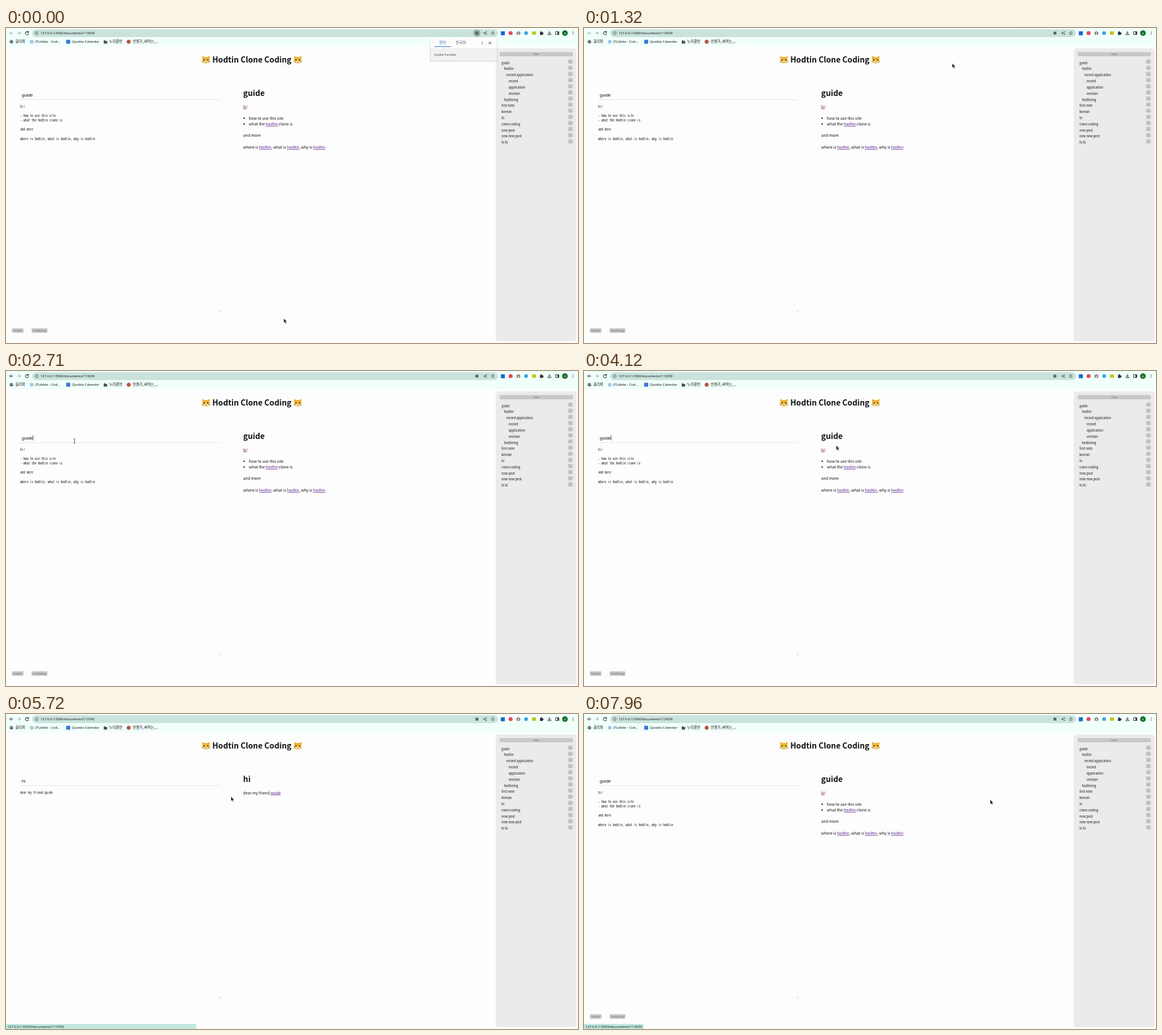
Write an HTML page that moves like this. It is 1007x556 px and loops after 7990 ms.

```html
<!DOCTYPE html>
<html lang="en">
<head>
<meta charset="utf-8">
<title>Notes</title>
<style>
html, body { margin: 0; width: 100%; height: 100%; overflow: hidden; background: #fdfdfd; }
svg { display: block; width: 1007px; height: 556px; }
text { white-space: pre; fill: #111; }
.ui { font-family: "Noto Sans", "Noto Sans CJK KR", "Noto Sans CJK JP", sans-serif; }
.doc { font-family: "Noto Sans CJK KR", "Noto Sans CJK JP", "Noto Sans CJK", sans-serif; }
.form { font-family: "Liberation Sans", Arial, sans-serif; }
.mono { font-family: "Noto Sans Mono CJK KR", "Noto Sans Mono CJK JP", monospace; }
.bold { font-weight: 700; }
.mid { text-anchor: middle; }
.link { fill: #551a8b; text-decoration: underline; }
.icon { fill: none; stroke: #333; stroke-width: 1; stroke-linecap: round; stroke-linejoin: round; }
</style>
</head>
<body>
<svg id="stage" viewBox="0 0 1007 556"></svg>
<script>
const LOOP = 7990;
const BODY = 6.88, HEAD = 13.76, FORM = 5.73;

const text = (x, y, str, size, cls, fill = '') =>
  `<text x="${x}" y="${y}" font-size="${size}" class="${cls}"${fill && ` style="fill:${fill}"`}>${str}</text>`;
const rect = (x, y, w, h, fill, r = 0) =>
  `<rect x="${x}" y="${y}" width="${w}" height="${h}" rx="${r}" fill="${fill}"/>`;
const circle = (x, y, r, fill) => `<circle cx="${x}" cy="${y}" r="${r}" fill="${fill}"/>`;
const icon = (x, y, d, style = '') =>
  `<path class="icon" transform="translate(${x} ${y})" d="${d}" style="${style}"/>`;
const group = (id, content) => `<g id="${id}">${content}</g>`;
const dots = x => y => [-2.2, 0, 2.2].map(d => circle(x, y + d, .7, '#444')).join('');
const link = str => `<tspan class="link">${str}</tspan>`;

const ARROW_LEFT = 'M2.7 0H-2.7M0 -2.7L-2.7 0 0 2.7';

function cat(x, y) {
  return `<g transform="translate(${x} ${y})">
    <path d="M-6.6 -6.6Q-6 -7.3 -2.6 -4.6H2.6Q6 -7.3 6.6 -6.6L6.4 1Q6 6.8 0 6.8T-6.4 1Z" fill="#f9bf2c"/>
    <path d="M-5.7 -5.3L-5.3 -2 -3.5 -3.8ZM5.7 -5.3L5.3 -2 3.5 -3.8Z" fill="#e58a55"/>
    <path d="M0 -4.5V-1.8M-1.7 -4.3V-2.5M1.7 -4.3V-2.5" stroke="#c7862a" stroke-width=".8"/>
    <ellipse cy="3.8" rx="3.6" ry="2.6" fill="#ffe7a2"/>
    ${circle(-3.1, .2, 1.2, '#3b2f2a')}${circle(3.1, .2, 1.2, '#3b2f2a')}
    <path d="M-1.2 2H1.2L0 3.2Z" fill="#d9576b"/>
    <path d="M0 3.2V4.2M-2 4.5Q-.8 5.5 0 4.2Q.8 5.5 2 4.5" fill="none" stroke="#5b4332" stroke-width=".5"/>
    <path d="M-4 3L-7.8 2.2M-4 4L-7.6 4.6M4 3L7.8 2.2M4 4L7.6 4.6" stroke="#6b5a48" stroke-width=".45"/>
  </g>`;
}

function browserBar() {
  return rect(0, 0, 1007, 32.5, '#f1fffb') + rect(46, 2.3, 820, 13.6, '#c9e2dc', 6.8) +
    `<g id="back">${icon(9.5, 9, ARROW_LEFT)}</g>` +
    icon(23, 9, 'M-2.7 0H2.7M0 -2.7L2.7 0 0 2.7', 'stroke:#9aa6a2') +
    icon(37, 9, 'M2.2 -1.6A2.8 2.8 0 1 0 2.7 1M2.7 -3V-1.2H.8', 'stroke-width:1.1') +
    icon(54, 9, 'M-2.7 0A2.7 2.7 0 1 0 2.7 0A2.7 2.7 0 1 0 -2.7 0M0 -.2V1.4M0 -1.5V-1.4', 'stroke-width:.6') +
    `<text id="address" x="61" y="11.2" font-size="5.85" class="ui"></text>` +
    circle(829, 9, 6.3, '#93aaa4').replace('<circle', '<circle id="glow"') +
    rect(826.5, 6.5, 5, 5, '#56625f', .6) +
    icon(843.5, 9, 'M2 -2L-2 0 2 2', 'stroke-width:.7') +
    circle(845.5, 7, 1, '#444') + circle(841.5, 9, 1, '#444') + circle(845.5, 11, 1, '#444') +
    icon(857, 9, 'M0 -3L.9 -1 3 -.8 1.4 .6 1.9 2.7 0 1.6 -1.9 2.7 -1.4 .6 -3 -.8 -.9 -1Z', 'stroke-width:.6') +
    rect(871.2, 5.8, 7, 7, '#1769d2') + circle(888.3, 9, 3.6, '#e14a62') +
    rect(898.8, 7, 6.6, 4.8, '#777', 1) + rect(900.8, 6, 2.6, 2, '#777') + circle(902.1, 9.4, 1.4, '#eee') +
    circle(915.6, 9, 3.3, '#35a4e8') + rect(926, 6, 7, 6, '#c9c51b', 1) +
    rect(940, 7.2, 5, 5, '#333', .6) + circle(942.3, 7, 1.3, '#333') + circle(945.2, 9.5, 1.3, '#333') +
    icon(956.7, 9, 'M0 -3V1M-1.9 -.8L0 1.1 1.9 -.8M-2.8 1.5V2.8H2.8V1.5') +
    icon(970.5, 9, 'M-2.7 -2.5H2.7V2.5H-2.7Z') + rect(970.8, 6.5, 2.4, 5, '#333') +
    circle(984, 9, 5, '#18752b') + text(984, 10.7, 'a', 5, 'ui mid', '#dff5e2') + dots(998.3)(9) +
    circle(9.5, 24.2, 3, '#4a5351') + icon(9.5, 24.2, 'M-2 -1L0 0 -1 2M.5 -2L2 0', 'stroke:#e5f3ef;stroke-width:.7') +
    text(16.5, 26.4, '클리퍼', 6.3, 'ui') +
    circle(45.3, 24.2, 3.3, '#9cc9e6') + text(51.7, 26.4, 'JTLibble - Cod…', 6.1, 'ui') +
    rect(106, 20.8, 7, 7, '#3b78dc', .8) + text(116, 26.4, 'Quobla Calendar', 6.1, 'ui') +
    `<path d="M172 21.8h2.4l.8 1h3v4.7h-6.2z" fill="#4c5653"/>` + text(181.5, 26.4, '누리콤반', 6.3, 'ui') +
    circle(216, 24.2, 3.5, '#b8573f') + text(223, 26.4, '언젠가_써먹는_…', 6.3, 'ui');
}

function sidebar() {
  const items = ['0guide', '1hodtin', '2record application', '3record', '3application', '3velsitan',
    '1hodtining', '0first note', '0korean', '0hi', '0clone coding', '0new post', '0new new post', '0hi hi'];
  return rect(862, 36, 142.5, 517, '#ebebeb', 5) + rect(869, 42.5, 129, 7.6, '#c8c8c8', 2) +
    text(933.5, 48.3, 'new', FORM, 'form mid', '#777') +
    items.map((item, i) => {
      const y = 63.6 + i * 10.82;
      return text(872.3 + item[0] * 4.15, y, item.slice(1), 5.55, 'doc') +
        rect(989.3, y - 8, 8.7, 7.7, '#c8c8c8', 1.8) + text(993.6, y - 2.3, '+', 5, 'form mid', '#777');
    }).join('');
}

function page() {
  return text(432.8, 60.8, 'Hodtin Clone Coding', HEAD, 'doc bold mid') + cat(352, 56) + cat(513.6, 56) +
    `<path d="M25 126.4H376" stroke="#cbc9d8" stroke-width=".7" stroke-dasharray="1.5 .6"/>` +
    `<path d="M374 502L377 499M375.7 502L377 500.7" stroke="#999" stroke-width=".5"/>`;
}

function tag(x, w, name) {
  return rect(x, 530, w, 8, '#c8c8c8', 2) + text(x + w / 2, 536, name, FORM, 'form mid', '#777');
}

function guidePage() {
  const notes = [[141, 'hi!'], [157.2, '- how to use this site'], [165.2, '- what the hodtin clone is'],
    [181.4, 'and more'], [197.5, 'where is hodtin, what is hodtin, why is hodtin']];
  const name = link('hodtin');
  return text(27.7, 120.7, 'guide', 8.03, 'form') +
    notes.map(([y, s]) => text(25, y, s, FORM, 'mono')).join('') +
    text(417.6, 120.3, 'guide', HEAD, 'doc bold') +
    text(417.6, 141.5, '<tspan class="link" style="fill:#6a2540">hi</tspan><tspan fill="#a92b35">!</tspan>', BODY, 'doc', '#a92b35') +
    circle(419.3, 159.2, 1.2, '#111') + text(427.6, 161.7, 'how to use this site', BODY, 'doc') +
    circle(419.3, 169.5, 1.2, '#111') + text(427.6, 172, `what the ${name} clone is`, BODY, 'doc') +
    text(417.6, 192.4, 'and more', BODY, 'doc') +
    text(417.6, 213, `where is ${name}, what is ${name}, why is ${name}`, BODY, 'doc') +
    tag(10.3, 20.7, 'hodtin') + tag(45, 28, 'hodtining');
}

function hiPage() {
  return text(27.7, 120.7, 'hi', 8.03, 'form') + text(25, 141, 'dear my friend guide', FORM, 'mono') +
    text(417.6, 120.3, 'hi', HEAD, 'doc bold') +
    text(417.6, 141.5, `dear my friend ${link('guide')}`, BODY, 'doc');
}

function translatePopup() {
  return rect(746.3, 17.5, 118.6, 41.6, '#c9c9d6', 1.5) + rect(747, 17, 117.2, 41, '#f1f1f1', 1.5) +
    rect(747, 17, 117.2, 18.5, '#fdfdfd', 1.5) + rect(754, 32.2, 29.5, 1.1, '#3478d8') +
    text(762.3, 28.3, '영어', 6.5, 'doc', '#2a6fd0') + text(791.7, 28.3, '한국어', 6.5, 'doc', '#555') +
    dots(838.5)(26.5) + icon(852, 26.5, 'M-1.8 -1.8L1.8 1.8M-1.8 1.8L1.8 -1.8') +
    text(754, 49.2, 'Quobla Translate', 4.75, 'ui', '#444');
}

const pointers = {
  arrow: '<path d="M0 0V8.3L1.9 6.6 3.2 9.6 4.7 8.9 3.4 6H5.9Z" fill="#222" stroke="#fff" stroke-width=".5"/>',
  beam: '<path d="M-1.8 -3.8H-.5L0 -3.3 .5 -3.8H1.8M0 -3.3V3.3M-1.8 3.8H-.5L0 3.3 .5 3.8H1.8" fill="none" stroke="#333" stroke-width=".8"/>',
  hand: '<path d="M-.8 0Q0 -1 .8 0V3.2L4.3 4.2Q5 4.6 4.8 6L4 9.4H-.4L-3 5.8Q-2.6 4.6 -.8 6Z" fill="#222" stroke="#fff" stroke-width=".5"/>'
};

document.getElementById('stage').innerHTML =
  rect(0, 0, 1007, 556, '#fdfdfd') + browserBar() + page() + sidebar() +
  group('guide', guidePage()) + group('hi', hiPage()) +
  rect(47.4, 113.3, .7, 9.3, '#111').replace('<rect', '<rect id="caret"') +
  group('popup', translatePopup()) +
  group('status', rect(0, 547, 335, 9, '#c0e8df').replace('<rect', '<rect id="bubble"') +
    '<text id="statusUrl" x="2.2" y="554" font-size="6.15" class="ui"></text>') +
  group('pointer', Object.entries(pointers).map(([k, v]) => group(k, v)).join(''));

const el = id => document.getElementById(id);
const show = (id, on) => el(id).setAttribute('visibility', on ? 'visible' : 'hidden');
const between = (v, a, b) => v >= a && v < b;
const url = id => `127.0.0.1:5500/documents/${id}`;

// time, x, y of the pointer
const path = [
  [0, 489, 512.5], [60, 489, 512.5], [670, 842, 9.5], [830, 852, 25.5], [1150, 852, 25.5],
  [1630, 150, 152], [1910, 112, 147], [2220, 116, 125], [2710, 120.5, 123.5], [3190, 124, 125],
  [3970, 456, 131], [4120, 444, 131.3], [4380, 437, 152], [4650, 437, 152], [4930, 421, 138],
  [5450, 421, 138], [5720, 396, 145.5], [6120, 133, 143], [6310, 133, 143], [6870, 484, 142],
  [7010, 484, 142], [7180, 453, 142], [7320, 453, 142], [7460, 474, 139], [7850, 474, 139],
  [7960, 715, 151], [LOOP, 715, 151]
];

function pointerAt(t) {
  const i = path.findIndex(k => k[0] > t);
  const [t0, x0, y0] = path[i - 1], [t1, x1, y1] = path[i];
  const p = (t - t0) / (t1 - t0), e = p * p * (3 - 2 * p);
  return [x0 + (x1 - x0) * e, y0 + (y1 - y0) * e];
}

function pointerKind(x, y, onHi) {
  if (between(x, 24, 378) && between(y, 110, 503)) return 'beam';
  if (!between(y, 134, 145)) return 'arrow';
  if (onHi) return between(x, 466, 484) ? 'hand' : between(x, 418, 466) ? 'beam' : 'arrow';
  return between(x, 417, 425) ? 'hand' : 'arrow';
}

function draw(t) {
  const onHi = between(t, 5300, 7520);
  const popup = t < 1100;
  show('guide', !onHi);
  show('hi', onHi);
  show('popup', popup);
  show('glow', popup);
  el('back').setAttribute('opacity', t < 2450 ? .4 : 1);
  el('address').textContent = url(onHi ? 113792 : 113639);

  show('caret', between(t, 2450, 5220) && (t - 2450) % 1200 < 600);

  const late = t >= 7350;
  show('status', late || between(t, 4800, 5900));
  el('bubble').setAttribute('width', late ? 105 : 335);
  el('statusUrl').textContent = url(late ? 113639 : 113792);

  const [x, y] = pointerAt(t);
  const kind = pointerKind(x, y, onHi);
  el('pointer').setAttribute('transform', `translate(${x} ${y})`);
  for (const k in pointers) show(k, k === kind);
}

const start = performance.now();
function tick() {
  draw((performance.now() - start) % LOOP);
  requestAnimationFrame(tick);
}
tick();
</script>
</body>
</html>
```
